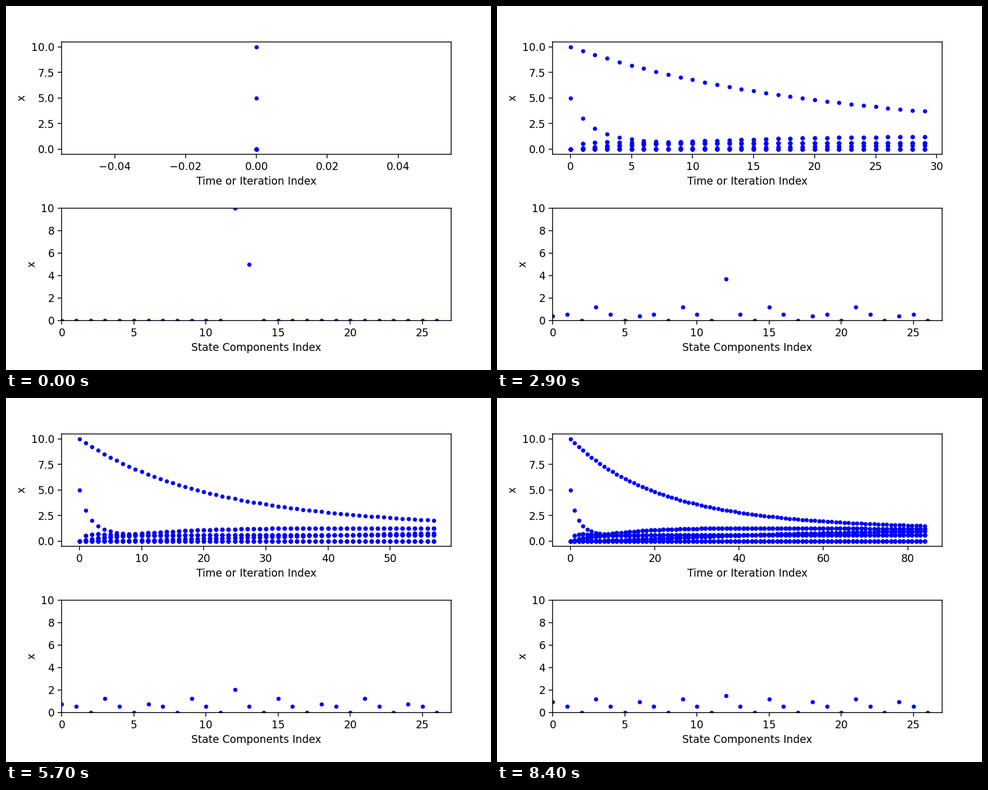
Write a matplotlib script that moves like this. It is 864x648 px and loops after 8500 ms.

```python
import numpy as np
import matplotlib.pyplot as plt
from matplotlib.animation import FuncAnimation

FRAMES = 85
SIDE = 3
RATES = np.array([0.01, 0.1, 0.01])  # coupling per state component


def grid_laplacian(n):
    path = np.diag([1.0] + [2.0] * (n - 2) + [1.0])
    path -= np.eye(n, k=1) + np.eye(n, k=-1)
    eye = np.eye(n)
    return np.kron(path, eye) + np.kron(eye, path)


def simulate(steps):
    """Consensus of 3-component agents on a square grid."""
    lap = grid_laplacian(SIDE)
    state = np.zeros((SIDE * SIDE, 3))
    state[SIDE * SIDE // 2] = 10, 5, 0
    history = []
    for _ in range(steps):
        history.append(state.ravel())
        state = state - RATES * (lap @ state)
    return np.array(history)


history = simulate(FRAMES)
count = history.shape[1]

fig, (top, low) = plt.subplots(2, 1, figsize=(6.4, 4.8), dpi=135)
fig.subplots_adjust(left=0.115, right=0.918, bottom=0.136, top=0.902,
                    hspace=0.48)

trail, = top.plot([], [], "b.")
top.set_xlabel("Time or Iteration Index")
top.set_ylabel("x")

current, = low.plot(np.arange(count), history[0], "b.")
low.set_xlim(0, count)
low.set_ylim(0, 10)
low.set_xlabel("State Components Index")
low.set_ylabel("x")


def draw(k):
    times = np.repeat(np.arange(k + 1), count)
    trail.set_data(times, history[:k + 1].ravel())
    top.relim()
    top.autoscale_view()
    current.set_ydata(history[k])
    return trail, current


def reset():
    return draw(0)


anim = FuncAnimation(fig, draw, frames=FRAMES, init_func=reset,
                     interval=100, repeat=True, repeat_delay=0)
plt.show()
```
